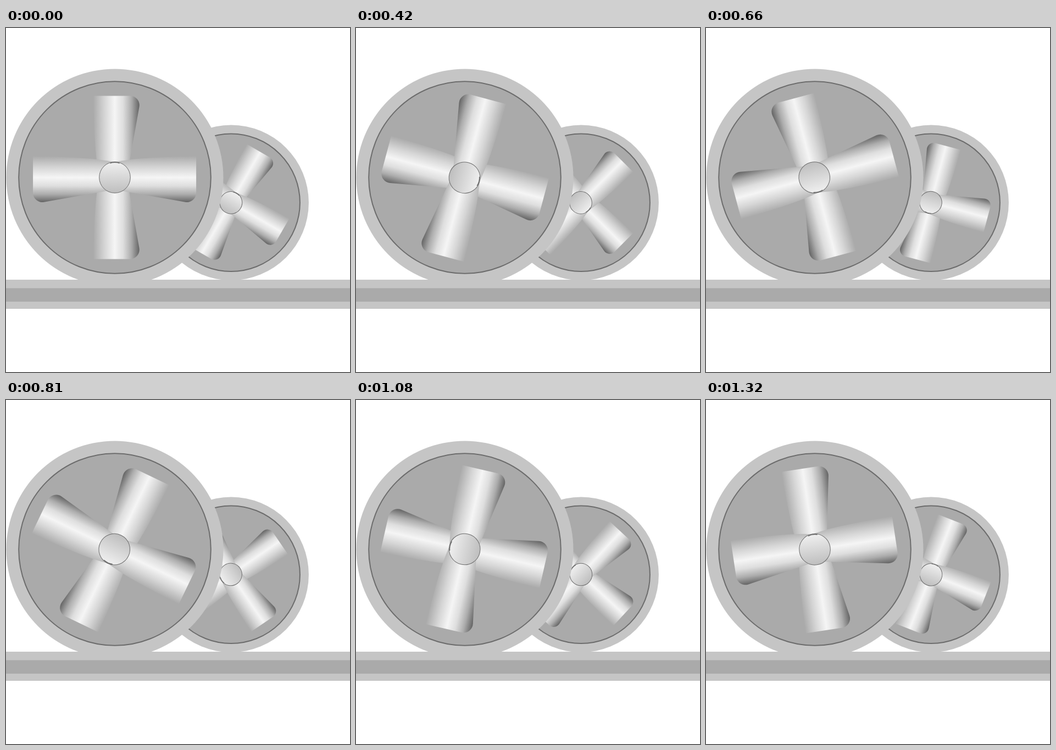
Animation, 626 px wide and 626 px high, one loop 1350 ms. Source, as an HTML page with a canvas:

```html
<!DOCTYPE html>
<html lang="en">
<head>
<meta charset="utf-8">
<title>Spinning wheels</title>
<style>
  html, body { margin: 0; width: 100%; height: 100%; overflow: hidden; background: #fff; }
  canvas { display: block; }
</style>
</head>
<body>
<canvas id="stage" width="626" height="626"></canvas>
<script>
const ctx = document.getElementById('stage').getContext('2d');
const STEP_MS = 30, STEPS = 45, HALF_STEP = 24;
const LIGHT = '#c5c5c5', GREY = '#aaaaaa', LINE = '#6c6c6c';
const DEG = Math.PI / 180;

function gradient(y0, y1, stops) {
  const g = ctx.createLinearGradient(0, y0, 0, y1);
  stops.forEach(([at, color]) => g.addColorStop(at, color));
  return g;
}

const metal = gradient(-39, 46, [
  [0, '#aaaaaa'], [0.25, '#d6d6d6'], [0.46, '#f5f5f5'],
  [0.64, '#dedede'], [0.82, '#acacac'], [1, '#606060']
]);
const hubFill = gradient(-28, 28, [[0, '#f0f0f0'], [1, '#bebebe']]);

function disc(x, y, r, fill) {
  ctx.beginPath();
  ctx.arc(x, y, r, 0, Math.PI * 2);
  ctx.fillStyle = fill;
  ctx.fill();
}

function outline(width) {
  ctx.strokeStyle = LINE;
  ctx.lineWidth = width;
  ctx.stroke();
}

// A blade points along +x, with its rounded dark side towards +y.
function blade(angle, flip) {
  ctx.save();
  ctx.rotate(angle * DEG);
  ctx.scale(1, flip);
  ctx.beginPath();
  ctx.moveTo(0, -28);
  ctx.quadraticCurveTo(42, -37, 148.5, -38.5);
  ctx.arcTo(148.5, 48.5, 120, 43.4, 17);
  ctx.lineTo(0, 22);
  ctx.closePath();
  ctx.fillStyle = metal;
  ctx.fill();
  ctx.restore();
}

function rotor(x, y, scale, angle) {
  ctx.save();
  ctx.translate(x, y);
  ctx.rotate(angle * DEG);
  ctx.scale(scale, scale);
  blade(-90, 1);
  blade(90, -1);
  blade(0, 1);
  blade(180, -1);
  disc(0.4, 0, 28.3, hubFill);
  outline(1 / scale);
  ctx.beginPath();
  ctx.arc(0.4, 0.5, 27.8, -108 * DEG, -72 * DEG);
  outline(1.6);
  ctx.restore();
}

function wheel(x, y, outer, inner, scale, angle) {
  disc(x, y, outer, LIGHT);
  disc(x, y, inner, GREY);
  outline(2);
  rotor(x - 0.4, y - 0.1, scale, angle);
}

function band(y, height, color) {
  ctx.fillStyle = color;
  ctx.fillRect(0, y, 626, height);
}

// Each half turn runs at its own constant speed.
function turn(step) {
  return step < HALF_STEP
    ? 180 * step / HALF_STEP
    : 180 + 180 * (step - HALF_STEP) / (STEPS - HALF_STEP);
}

function draw() {
  const angle = turn(Math.floor(performance.now() / STEP_MS) % STEPS);
  band(0, 626, '#ffffff');
  wheel(409.6, 317.8, 141.3, 125.3, 0.718, angle + 30);
  wheel(198, 272, 197.5, 174.8, 1, angle);
  band(458, 53, LIGHT);
  band(473.5, 24.5, GREY);
  requestAnimationFrame(draw);
}
draw();
</script>
</body>
</html>
```
